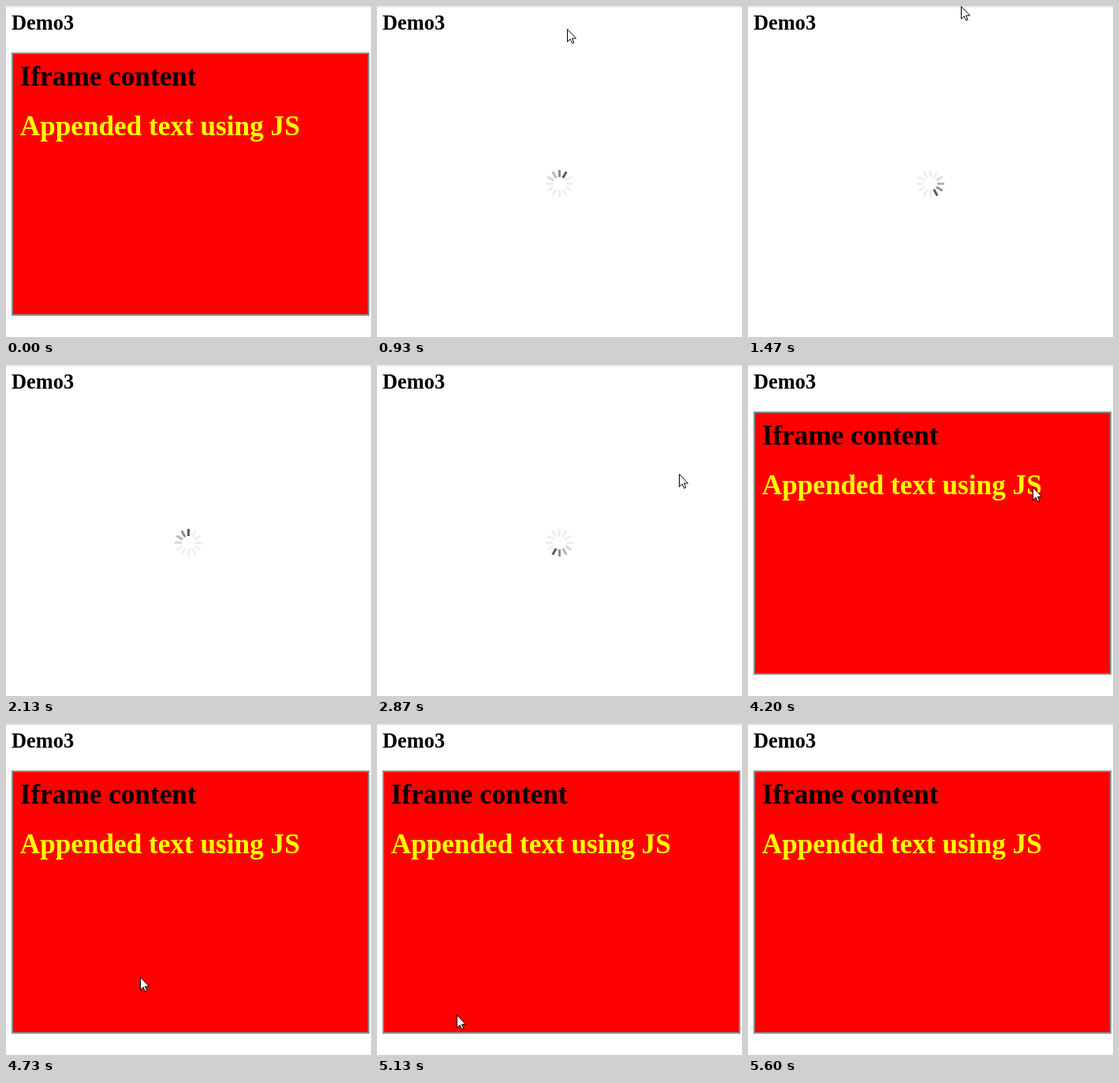
Animation of 463x420 px, one loop 6.54 s. Source, as an HTML page with a canvas:

```html
<!DOCTYPE html>
<html lang="en">
<head>
<meta charset="utf-8">
<title>Demo3</title>
<style>
  html, body { margin: 0; width: 100%; height: 100%; overflow: hidden; background: #fff; }
  canvas { display: block; }
</style>
</head>
<body>
<canvas id="stage" width="463" height="420"></canvas>
<script>
const ctx = document.getElementById('stage').getContext('2d');
const LOOP = 6540;
const TICK = 1000 / 15;
const LOAD_START = 14, LOAD_END = 44;

// Pointer visits: [tick, x, y]; the pointer leaves one tick after the last point.
const visits = [
  [[14, 241, 29], [15, 241, 29], [18, 270, 0], [26, 270, 0]],
  [[41, 436, 44], [42, 398, 115], [43, 383, 138], [62, 383, 138], [65, 317, 190],
   [71, 170, 321], [72, 149, 336], [75, 112, 362], [82, 72, 388], [83, 68, 398]]
];
const spokeTones = ['#5c5c5c', '#8f8f8f', '#b6b6b6', '#d9d9d9'];
const arrow = new Path2D('M.5 .5V16.5L4.2 13L6.6 18.4L8.8 17.4L6.5 12.1H11.5Z');

function rect(x, y, w, h, color) {
  ctx.fillStyle = color;
  ctx.fillRect(x, y, w, h);
}

function heading(text, x, y, size, color) {
  ctx.font = `bold ${size}px "Liberation Serif", "Times New Roman", serif`;
  ctx.fillStyle = color;
  ctx.fillText(text, x, y);
}

function drawPage() {
  rect(0, 0, 463, 420, '#fff');
  rect(0, 0, 463, 1, '#e8e8e8');
  rect(0, 1, 463, 1, '#f0f0f0');
  rect(0, 2, 463, 1, '#fafafa');
  heading('Demo3', 7, 30, 26.4, '#000');
}

function drawPanel() {
  rect(7, 59, 454, 334, '#8c8c8c');
  rect(9, 61, 450, 330, '#f00');
  heading('Iframe content', 17.8, 101, 35.2, '#000');
  heading('Appended text using JS', 17.8, 164, 35.2, '#ff0');
}

function drawSpinner(tick) {
  const head = Math.max(1, 11 + Math.floor((tick * TICK - 2020) / 100));
  ctx.lineWidth = 3;
  ctx.lineCap = 'butt';
  for (let i = 0; i < 12; i++) {
    const age = (head - i + 12) % 12;
    ctx.save();
    ctx.translate(231.5, 225.5);
    ctx.rotate(i * Math.PI / 6);
    ctx.strokeStyle = spokeTones[age] || '#eee';
    ctx.beginPath();
    ctx.moveTo(0, -8.5);
    ctx.lineTo(0, -17.5);
    ctx.stroke();
    ctx.restore();
  }
}

function pointerAt(tick) {
  const path = visits.find(v => tick >= v[0][0] && tick <= v[v.length - 1][0]);
  if (!path) return null;
  const next = path.findIndex(p => p[0] >= tick);
  const b = path[next], a = path[Math.max(0, next - 1)];
  const k = b === a ? 0 : (tick - a[0]) / (b[0] - a[0]);
  return [1, 2].map(i => Math.round(a[i] + (b[i] - a[i]) * k));
}

function drawPointer(tick) {
  const pos = pointerAt(tick);
  if (!pos) return;
  ctx.save();
  ctx.translate(pos[0], pos[1]);
  ctx.fillStyle = '#fff';
  ctx.strokeStyle = '#000';
  ctx.lineWidth = 1;
  ctx.fill(arrow);
  ctx.stroke(arrow);
  ctx.restore();
}

function render() {
  // The small lead absorbs the rounding of tick times to 10 ms.
  const tick = Math.floor((performance.now() % LOOP + 6) / TICK);
  drawPage();
  if (tick >= LOAD_START && tick < LOAD_END) drawSpinner(tick);
  else drawPanel();
  drawPointer(tick);
  requestAnimationFrame(render);
}
render();
</script>
</body>
</html>
```
